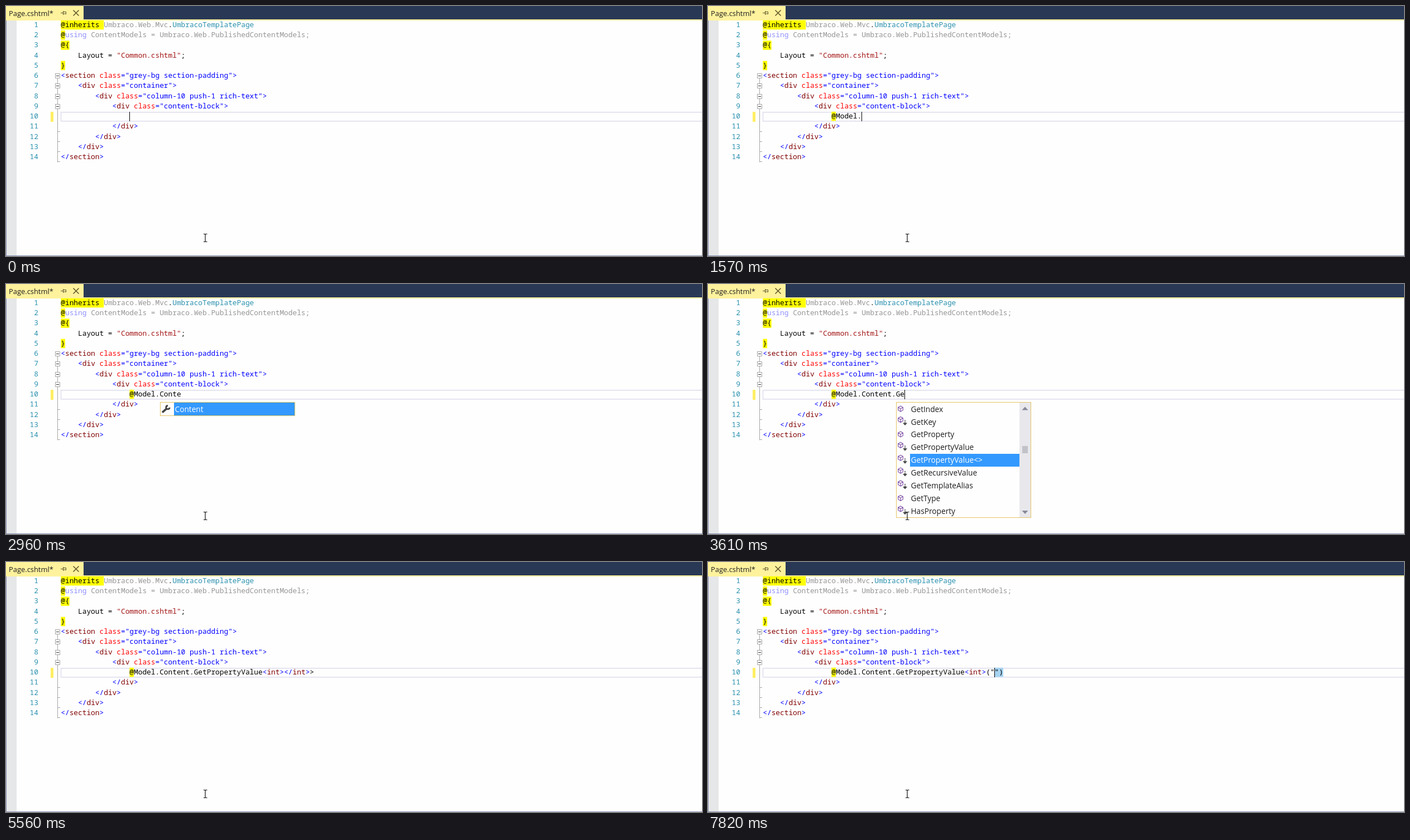
Animation, 1247 px wide and 449 px high, one loop 8000 ms. Source, as an HTML page with a canvas:

```html
<!DOCTYPE html>
<html lang="en">
<head>
<meta charset="utf-8">
<title>Page.cshtml</title>
<style>
  html, body { margin: 0; width: 100%; height: 100%; overflow: hidden; }
  canvas { display: block; }
</style>
</head>
<body>
<canvas id="stage" width="1247" height="449"></canvas>
<script>
const ctx = document.getElementById('stage').getContext('2d');
const LOOP = 8000, ADV = 7.69, ROW = 22.9;
const CODE = '12.82px "Noto Sans Mono", monospace';
const UI = '13.7px "Open Sans", "Noto Sans", sans-serif';
const BLUE = '#0000ff', MAROON = '#800000', RED = '#ff0000', TEAL = '#2b91af',
      GREY = '#969696', BLACK = '#000', YELLOW = '#ffff00';

const colX = col => 98.3 + ADV * col;
const baseY = line => 38 + 18.23 * (line - 1);
const count = (times, t) => times.filter(k => t >= k).length;
const within = (t, [a, b]) => t >= a && t < b;

function rect(x, y, w, h, color) {
  ctx.fillStyle = color;
  ctx.fillRect(x, y, w, h);
}
function text(s, x, y, color, font) {
  ctx.font = font;
  ctx.fillStyle = color;
  ctx.fillText(s, x, y);
}
// Polylines: each argument is a flat list of x, y pairs.
function lines(color, width, ...paths) {
  ctx.strokeStyle = color;
  ctx.lineWidth = width;
  ctx.beginPath();
  for (const p of paths)
    for (let i = 0; i < p.length; i += 2)
      i ? ctx.lineTo(p[i], p[i + 1]) : ctx.moveTo(p[i], p[i + 1]);
  ctx.stroke();
}
function poly(color, ...p) {
  ctx.fillStyle = color;
  ctx.beginPath();
  for (let i = 0; i < p.length; i += 2) ctx.lineTo(p[i], p[i + 1]);
  ctx.fill();
}

// Code writers return the column after the text.
function write(line, col, s, color = BLACK, back) {
  if (back) rect(colX(col), baseY(line) - 12.3, ADV * s.length, 16.6, back);
  text(s, colX(col), baseY(line), color, CODE);
  return col + s.length;
}
function html(line, col, s) {
  for (const m of s.matchAll(/"[^"]*"|<\/?|[=>]|[\w-]+/g)) {
    const word = /\w/.test(m[0][0]);
    const color = !word ? BLUE : s[m.index + m[0].length] === '=' ? RED : MAROON;
    write(line, col + m.index, m[0], color);
  }
  return col + s.length;
}

const MARKUP = [
  [6, 0, '<section class="grey-bg section-padding">'],
  [7, 4, '<div class="container">'],
  [8, 8, '<div class="column-10 push-1 rich-text">'],
  [9, 12, '<div class="content-block">'],
  [11, 12, '</div>'], [12, 8, '</div>'], [13, 4, '</div>'], [14, 0, '</section>']
];

function drawFrame() {
  rect(0, 0, 1247, 449, '#fefefe');
  rect(0, 0, 1247, 24, '#293955');
  rect(0, 0, 139, 24, '#fff29d');
  rect(0, 24, 1247, 2, '#fff29d');
  rect(1, 26, 18, 422, '#e6e7e8');
  rect(0, 26, 1, 423, '#8591b4');
  rect(0, 448, 1247, 1, '#8591b4');
  text('Page.cshtml*', 5, 17.5, '#1e1e1e', '12.9px "Open Sans", "Noto Sans", sans-serif');
  lines('#5f5328', 1, [98, 12.5, 102, 12.5], [102.5, 9, 102.5, 16],
        [103, 10.5, 107.5, 10.5, 107.5, 14.5], [103, 14, 108, 14]);
  lines('#5f5328', 1.5, [120.5, 7.5, 130.5, 17.5], [130.5, 7.5, 120.5, 17.5]);
}

function drawCode(t) {
  for (let n = 1; n < 15; n++)
    text(String(n), 58 - ADV * String(n).length, baseY(n), TEAL, CODE);
  rect(80, 190, 5, 18, '#ffee62');
  lines('#dedeee', 1.5, [1247, 190.75, 98.5, 190.75, 98.5, 206.75, 1247, 206.75]);

  // Outlining margin
  lines('#a5a5a5', 1, [92.5, 130, 92.5, 280.5],
        ...[11, 12, 13, 14].map(n => Math.floor(baseY(n) + 5) + .5).map(y => [92.5, y, 97, y]));
  for (let n = 6; n < 10; n++) {
    const y = Math.round(baseY(n) - 4) + .5;
    rect(88, y - 4.5, 9, 9, '#fefefe');
    lines('#a5a5a5', 1, [88.5, y - 4, 96.5, y - 4, 96.5, y + 4, 88.5, y + 4, 88.5, y - 4.5]);
    lines('#333', 1, [90, y, 95, y]);
  }

  const stale = within(t, [280, 430]) || within(t, [4410, 4680]);
  let c = write(1, 0, '@inherits ', BLACK, YELLOW);
  c = write(1, c, 'Umbraco.Web.Mvc', GREY);
  c = write(1, c, '.');
  write(1, c, 'UmbracoTemplatePage', stale ? BLACK : TEAL);
  c = write(2, 0, '@', BLACK, YELLOW);
  c = write(2, c, 'using', '#9090ff');
  write(2, c, ' ContentModels = Umbraco.Web.PublishedContentModels;', GREY);
  write(3, 0, '@{', BLACK, YELLOW);
  c = write(4, 4, 'Layout = ');
  c = write(4, c, '"Common.cshtml"', '#a31515');
  write(4, c, ';');
  write(5, 0, '}', BLACK, YELLOW);
  for (const m of MARKUP) html(...m);
}

const CALL = '@Model.Content.GetPropertyValue';
const KEYS = [280, 860, 950, 1000, 1090, 1330, 1540, 2120, 2420, 2540, 2650, 2760,
              3210, 3300, 3390, 3520, 3610, 3760];
const TAG_KEYS = [4410, 4680, 4780, 4890, 5190];
const DELETES = [6240, 6360, 6480, 6600, 6780, 6900, 7080];
const CARET_OFF = [[610, 860], [1930, 2120], [2960, 3210], [4220, 4410], [5560, 6050], [7170, 7630]];

function drawTyping(t) {
  const call = t < 3950 ? CALL.slice(0, count(KEYS, t)) : CALL;
  const tag = '<int>'.slice(0, count(TAG_KEYS, t));
  let c = write(10, 16, call.slice(0, 1), BLACK, YELLOW);
  c = write(10, c, call.slice(1));
  if (t < 5560) {
    write(10, c, tag[0] || '', BLUE);
    write(10, c + 1, tag.slice(1, 4));
    write(10, c + 4, tag.slice(4), BLUE);
    c += tag.length;
  } else c = html(10, c, tag);
  c = write(10, c, '("'.slice(0, count([7630, 7820], t)));

  if (within(t, [4410, 5190])) write(10, c, '>', BLUE);
  else if (within(t, [5190, 6240])) write(10, html(10, c, '</int>'), '>');
  else if (within(t, [6240, 7630])) write(10, c, '</int>>'.slice(count(DELETES, t)));
  else if (t >= 7630) write(10, c, t < 7820 ? ')' : '")', BLACK, '#a6d3f0');

  if (!CARET_OFF.some(span => within(t, span))) rect(Math.round(colX(c) - .3), 190, 1, 17, BLACK);
}

const diamond = (x, y, r, color) => poly(color, x - r, y, x, y - r, x + r, y, x, y + r);
function cube(x, y) {
  lines('#7b4aa3', 1.1, [x, y - 5, x + 4.3, y - 2.6, x + 4.3, y + 2.4, x, y + 5, x - 4.3, y + 2.4,
        x - 4.3, y - 2.6, x, y - 5], [x - 4.3, y - 2.6, x, y, x + 4.3, y - 2.6], [x, y, x, y + 5]);
}
const ICONS = {
  c(x, y) {
    lines('#c27d1a', 1.3, [x - 4, y - 3, x + 5, y - 1], [x - 1, y - 2, x - 1, y + 4, x + 4, y + 4]);
    diamond(x - 4, y - 3, 4.4, '#c27d1a');
    diamond(x + 5, y - 1, 3, '#c27d1a');
    diamond(x + 4, y + 4.5, 3, '#c27d1a');
  },
  i(x, y) {
    lines('#00539c', 1.5, [x - 5, y - 1, x + 2, y - 1]);
    diamond(x - 6, y - 1, 2.6, '#00539c');
    ctx.beginPath();
    ctx.arc(x + 5, y - 1, 3, 0, 7);
    ctx.stroke();
  },
  e(x, y) {
    for (const [dx, dy] of [[-2, -5], [-7, 0]]) {
      ctx.strokeRect(x + dx, y + dy, 6, 4);
      rect(x + dx + 1.5, y + dy + 1.5, 3, 1, '#c27d1a');
    }
  },
  p(x, y) {
    lines('#424242', 3.6, [x - 7, y + 6, x + 1, y - 1]);
    ctx.lineWidth = 3;
    ctx.beginPath();
    ctx.arc(x + 3, y - 3, 3.2, .1, 4.7);
    ctx.stroke();
  },
  m(x, y) { cube(x - 3, y - .5); },
  x(x, y) {
    cube(x - 3, y - 4);
    ctx.setLineDash([2, 1]);
    lines('#424242', 1.6, [x + 5, y - 3, x + 5, y + 3]);
    ctx.setLineDash([]);
    poly('#424242', x + 1, y + 2, x + 9, y + 2, x + 5, y + 6.5);
  }
};

// Each item is an icon letter, a space and a label.
const list = s => s.split(',');
const POPUPS = [
  { span: [860, 1540], x: 230, w: 351, sel: 4, thumb: [297, 17], rows: list(
    'i IModelBinderProvider,e InsertionMode,c LinqBinaryModelBinder,c MergeModelStateToChildActionAttribute,' +
    'p Model,c ModelBinderAttribute,c ModelBinderDictionary,c ModelBinderProviderCollection,c ModelBinderProviders') },
  { span: [2120, 2480], x: 276, w: 242, sel: 1, thumb: [233, 124], rows: list(
    'x AsEnumerableOfOne<>,p Content,p CurrentCulture,x DisposeIfDisposable,m Equals,m GetHashCode,' +
    'm GetType,x IfNotNull<>,x IfNull<>') },
  { span: [2480, 2600], x: 276, w: 242, sel: 0, rows: list('p Content,p CurrentCulture,m GetHashCode') },
  { span: [2600, 3390], x: 276, w: 242, sel: 0, rows: ['p Content'] },
  { span: [3520, 3950], x: 337, w: 242, sel: 4, thumb: [291, 13], rows: list(
    'm GetIndex,x GetKey,m GetProperty,x GetPropertyValue,x GetPropertyValue<>,x GetRecursiveValue,' +
    'x GetTemplateAlias,m GetType,x HasProperty') },
  { span: [4680, 4890], x: 467, w: 179, sel: 3, thumb: [300, 14], rows: list(
    'i IEnumerable<>,i IHtmlString,i IList<>,c int,c Int16,c Int32,c Int64,c IntPtr,i IQueryable<>') },
  { span: [4890, 5190], x: 467, w: 179, sel: 0, rows: list('c int,c Int16,c Int32,c Int64,c IntPtr') }
];

function drawPopup({ x, w, sel, thumb, rows }) {
  const h = Math.round(rows.length * ROW + 2), right = x + w - (thumb ? 21 : 1);
  rect(x, 212, w, h, '#e5c365');
  rect(x + 1, 213, w - 2, h - 2, '#fefefe');
  if (thumb) {
    const mid = right + 10;
    rect(right, 213, 20, h - 2, '#e8e8ec');
    rect(mid - 5, thumb[0], 10, thumb[1], '#c2c3c9');
    poly('#868999', mid - 5.5, 226.5, mid + 5.5, 226.5, mid, 220.5);
    poly('#868999', mid - 5.5, 407, mid + 5.5, 407, mid, 413);
  }
  rows.forEach((item, i) => {
    const y = 224.6 + ROW * i;
    if (i === sel) rect(x + 25, Math.round(y - 11.4), right - x - 25, 23, '#3399ff');
    ctx.strokeStyle = '#c27d1a';
    ctx.lineWidth = 1.2;
    ICONS[item[0]](x + 11, y);
    text(item.slice(2), x + 26.5, y + 5, i === sel ? '#fff' : '#1e1e1e', UI);
  });
}

function drawPointer() {
  lines('#111', 1.2, [354, 409.5, 356, 409.5, 357, 410.5, 358, 409.5, 360.5, 409.5],
        [357, 410, 357, 423], [354, 423.5, 356, 423.5, 357, 422.5, 358, 423.5, 360.5, 423.5]);
}

function draw(now) {
  const t = now % LOOP;
  drawFrame();
  drawCode(t);
  drawTyping(t);
  POPUPS.filter(p => within(t, p.span)).forEach(drawPopup);
  drawPointer();
}

const start = performance.now();
(function tick() {
  draw(performance.now() - start);
  requestAnimationFrame(tick);
})();
</script>
</body>
</html>
```
